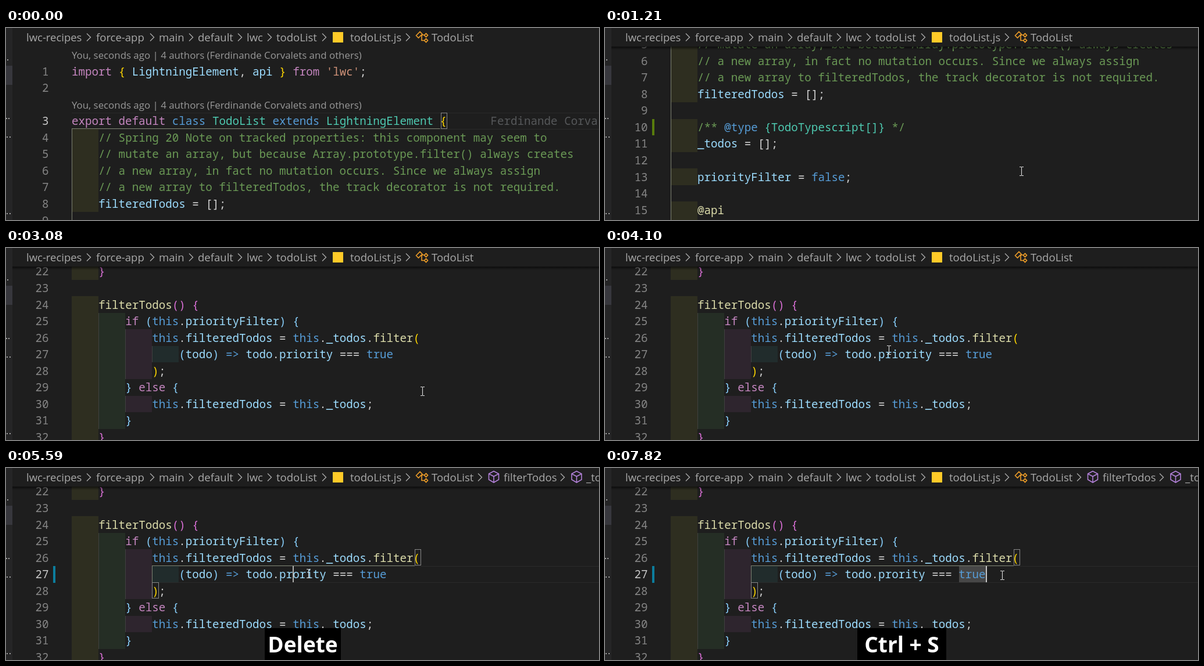
These frames come from a looping animation (1020x331 px, 8 s). An HTML page with a canvas:

```html
<!DOCTYPE html>
<html lang="en">
<head>
<meta charset="utf-8">
<title>Editor walkthrough</title>
<style>
html, body { margin: 0; width: 100%; height: 100%; overflow: hidden; background: #1e1e1e; }
canvas { display: block; }
</style>
</head>
<body>
<canvas id="stage" width="1020" height="331"></canvas>
<script>
const ctx = document.getElementById('stage').getContext('2d');
const LOOP = 8000, LEFT = 113, CHAR = 11.52, ROW = 28.55, TICK = 94.6;
const MONO = '19.2px "Noto Sans Mono", monospace';
const UI = '"Open Sans", "Noto Sans", sans-serif';
const EDIT = 5520, CLICK = 4520;

const COLORS = {
  p: '#c586c0', b: '#569cd6', t: '#4ec9b0', v: '#9cdcfe', s: '#ce9178', f: '#dcdcaa',
  c: '#6a9955', d: '#d4d4d4', g: '#ffd700', o: '#da70d6', l: '#87cefa'
};
const INDENTS = ['#2e2e20', '#252e25', '#2e252e', '#212c2c'];

// Each "~x" starts a run in colour x.
const CODE = [
  '~pimport ~g{ ~vLightningElement~d, ~vapi ~g} ~pfrom ~s\'lwc\'~d;',
  '',
  '~pexport default ~bclass ~tTodoList ~bextends ~tLightningElement ~g{',
  '    ~c// Spring 20 Note on tracked properties: this component may seem to',
  '    ~c// mutate an array, but because Array.prototype.filter() always creates',
  '    ~c// a new array, in fact no mutation occurs. Since we always assign',
  '    ~c// a new array to filteredTodos, the track decorator is not required.',
  '    ~vfilteredTodos ~d= [];',
  '',
  '    ~c/** ~b@type ~t{TodoTypescript[]} ~c*/',
  '    ~v_todos ~d= [];',
  '',
  '    ~vpriorityFilter ~d= ~bfalse~d;',
  '',
  '    ~f@api',
  '    ~bget ~ftodos~o() {',
  '        ~preturn ~bthis~d.~v_todos~d;',
  '    ~o}',
  '    ~bset ~ftodos~o(~vvalue~o) {',
  '        ~bthis~d.~v_todos ~d= ~vvalue~d;',
  '        ~bthis~d.~ffilterTodos~l()~d;',
  '    ~o}',
  '',
  '    ~ffilterTodos~o() {',
  '        ~pif ~l(~bthis~d.~vpriorityFilter~l) {',
  '            ~bthis~d.~vfilteredTodos ~d= ~bthis~d.~v_todos~d.~ffilter~g(',
  '                ~l(~vtodo~l) ~b=> ~vtodo~d.~vpriority ~d=== ~btrue',
  '            ~g)~d;',
  '        ~l} ~pelse ~l{',
  '            ~bthis~d.~vfilteredTodos ~d= ~bthis~d.~v_todos~d;',
  '        ~l}',
  '    ~o}'
];
const SCROLLS = [870, 1140, 1540, 1870, 2330, 2730, 3080];

// Pointer stops: time, x, y
const POINTER = [
  [260, 895, 306], [470, 717, 246], [3200, 717, 246], [4040, 489, 175],
  [4980, 489, 175], [5000, 521, 181], [6000, 521, 181], [6420, 660, 181],
  [6500, 660, 181], [6750, 684, 184]
];

const col = n => LEFT + n * CHAR;
const within = (t, a, b) => t >= a && t < b;

function rect(color, x, y, w, h) {
  ctx.fillStyle = color;
  ctx.fillRect(x, y, w, h);
}
function frame(color, x, y, w, h) {
  ctx.strokeStyle = color;
  ctx.lineWidth = 1;
  ctx.strokeRect(x + .5, y + .5, w - 1, h - 1);
}
function text(str, x, y, color, font, align = 'left') {
  ctx.font = font;
  ctx.fillStyle = color;
  ctx.textAlign = align;
  ctx.fillText(str, x, y);
}
function stroke(path, color, width) {
  ctx.strokeStyle = color;
  ctx.lineWidth = width;
  ctx.stroke(new Path2D(path));
}
function runs(line, x, y) {
  for (const [i, part] of line.split('~').entries()) {
    const str = i ? part.slice(1) : part;
    text(str, x, y, COLORS[i ? part[0] : 'd'], MONO);
    x += str.length * CHAR;
  }
}

function drawEditor(t) {
  const scroll = SCROLLS.filter(s => t >= s).length * TICK;
  const mid = n => (n < 3 ? 74.5 + (n - 1) * ROW : 160.2 + (n - 3) * ROW) - scroll;
  const top = n => Math.round(mid(n) - ROW / 2);
  const edited = t >= EDIT, active = t < CLICK ? 3 : 27;
  const lens = 'You, seconds ago | 4 authors (Ferdinande Corvalets and others)';

  ctx.save();
  ctx.beginPath();
  ctx.rect(11, 32, 1009, 299);
  ctx.clip();

  rect('#2a2a2a', LEFT, top(active), 907, 1);
  rect('#2a2a2a', LEFT, top(active + 1), 907, 1);

  CODE.forEach((line, i) => {
    const n = i + 1, y = top(n), h = top(n + 1) - y;
    if (y > 331 || y < -30) return;
    const depth = line.search(/[^ ]/) / 4;
    for (let k = 0; k < depth; k++) {
      rect(INDENTS[k], Math.round(col(k * 4)), y, 46, h);
      if (k) rect('#404040', Math.round(col(k * 4)), y, 1, h);
    }
  });

  const guide = '#7d8272';
  if (active === 3) {
    const y = top(4);
    rect(guide, LEFT, y - 1, col(55) - LEFT, 1);
    rect(guide, LEFT, y, 1, 400);
    frame('#888888', 748, top(3), 11, 28);
  } else {
    rect(guide, 251, top(27) - 1, 452, 1);
    rect(guide, 251, top(27), 1, 29);
    frame('#888888', 703, top(26), 11, 28);
    frame('#888888', 251, top(28), 12, 28);
  }

  if (within(t, 4720, EDIT)) rect('#474747', 471, top(27), 92, 28);
  if (t >= 7090) rect('#474747', 609, top(27), 46, 28);

  for (const y of [47, 133]) text(lens, LEFT, Math.round(y + 6 - scroll), '#999999', '16.85px ' + UI);
  CODE.forEach((line, i) => {
    const n = i + 1, y = Math.round(mid(n) + 7);
    if (y > 355 || y < 10) return;
    text(n, 73.5, y, n === active ? '#c6c6c6' : '#858585', MONO, 'right');
    runs(n === 27 && edited ? line.replace('priority', 'prority') : line, LEFT, y);
  });

  const blame = '#56585a';
  if (active === 3) text('Ferdinande Corva', 833.5, Math.round(mid(3) + 7), blame, MONO);
  if (within(t, 4790, EDIT)) text('Timo Quastenfeld, 2 year', 741, Math.round(mid(27) + 7), blame, MONO);

  rect('#587c0c', 81, top(10), 4, 28);
  if (edited) rect('#0c7d9d', 81, top(27), 4, 29);

  if (within(t, CLICK, 5050) || within(t, EDIT, 6060)) rect('#aeafad', 493, top(27), 2, 28);
  if (within(t, 6820, 7360) || t >= 7820) rect('#c8c8c8', 655, top(27), 2, 28);

  if (scroll) {
    const shade = ctx.createLinearGradient(0, 32, 0, 38);
    shade.addColorStop(0, 'rgba(0,0,0,.6)');
    shade.addColorStop(1, 'rgba(0,0,0,0)');
    rect(shade, 11, 32, 1009, 6);
  }

  if (within(t, 4380, CLICK) || within(t, 5190, EDIT)) {
    rect('#252526', 471, 128, 350, 40);
    frame('#454545', 471, 128, 350, 40);
    runs('~d(property) ~vpriority~d: ~tboolean', 484, 155);
  }
  ctx.restore();
}

function drawSidebar() {
  rect('#252526', 0, 0, 11, 331);
  rect('#37373d', 0, 65, 11, 33);
  for (const [x, y] of [[2, 54], [0, 155], [4, 155], [1, 187], [6, 187], [1, 319], [6, 319]])
    rect('#a0a0a0', x, y, 2, 2);
}

function drawCrumbs(t) {
  const grey = '#a9a9a9';
  const crumb = (str, x) => text(str, x, 23, grey, '18.5px ' + UI);
  const chevron = x => stroke(`M${x - 3} 9.5l6.5 6.5l-6.5 6.5`, grey, 1.4);
  const cube = x => stroke(
    `M${x} 5.5l8.5 4.5v10l-8.5 5l-8.5 -5v-10zM${x - 8.5} 10l8.5 4.5l8.5 -4.5M${x} 14.5v10.5`, '#b180d7', 1.6);

  [['lwc-recipes', 35], ['force-app', 155], ['main', 263], ['default', 330], ['lwc', 414],
   ['todoList', 465], ['todoList.js', 592], ['TodoList', 732]].forEach(c => crumb(...c));
  [142, 251, 318, 402, 453, 547, 691].forEach(chevron);
  rect('#ffca28', 562, 7, 18, 18);
  stroke('M705.5 13l6.5 -6.5l4 4l-6.5 6.5zM714 12h6M715 12v9.500h5' +
    'M719.500 12.500l3 -3l3 3l-3 3zM719.500 21.500l3 -3l3 3l-3 3z', '#ee9d28', 1.6);
  if (t >= 4720) {
    [815, 957].forEach(chevron);
    [839, 981.5].forEach(cube);
    crumb('filterTodos', 856);
    crumb('_todos', 998);
  }
}

function drawPointer(t) {
  if (t < POINTER[0][0]) return;
  const now = Math.floor((t - 50) / 70) * 70 + 50;
  const next = POINTER.findIndex(k => k[0] > now);
  const b = POINTER[next < 0 ? POINTER.length - 1 : next];
  const a = next < 1 ? b : POINTER[next - 1];
  const u = a === b ? 1 : (now - a[0]) / (b[0] - a[0]);
  const e = u * u * (3 - 2 * u);
  const x = Math.round(a[1] + (b[1] - a[1]) * e) - .5;
  const y = Math.round(a[2] + (b[2] - a[2]) * e) + .5;
  const beam = `M${x - 3.5} ${y - 7}h3M${x + .5} ${y - 7}h3M${x} ${y - 7}v15M${x - 3.5} ${y + 8}h3M${x + .5} ${y + 8}h3`;
  stroke(beam, '#e0e0e0', 1.1);
}

function drawKeys(t) {
  const keys = (label, x, w) => {
    rect('#000', x, 276, w, 55);
    text(label, x + w / 2, 318, '#fff', 'bold 37px ' + UI, 'center');
  };
  if (within(t, 5590, 6200)) keys('Delete', 445, 131);
  if (t >= 7360) keys('Ctrl + S', 434, 153);
}

function draw(t) {
  rect('#1e1e1e', 0, 0, 1020, 331);
  drawEditor(t);
  drawSidebar();
  drawCrumbs(t);
  drawPointer(t);
  drawKeys(t);
}

const start = performance.now();
function tick() {
  draw((performance.now() - start) % LOOP);
  requestAnimationFrame(tick);
}
tick();
</script>
</body>
</html>
```
